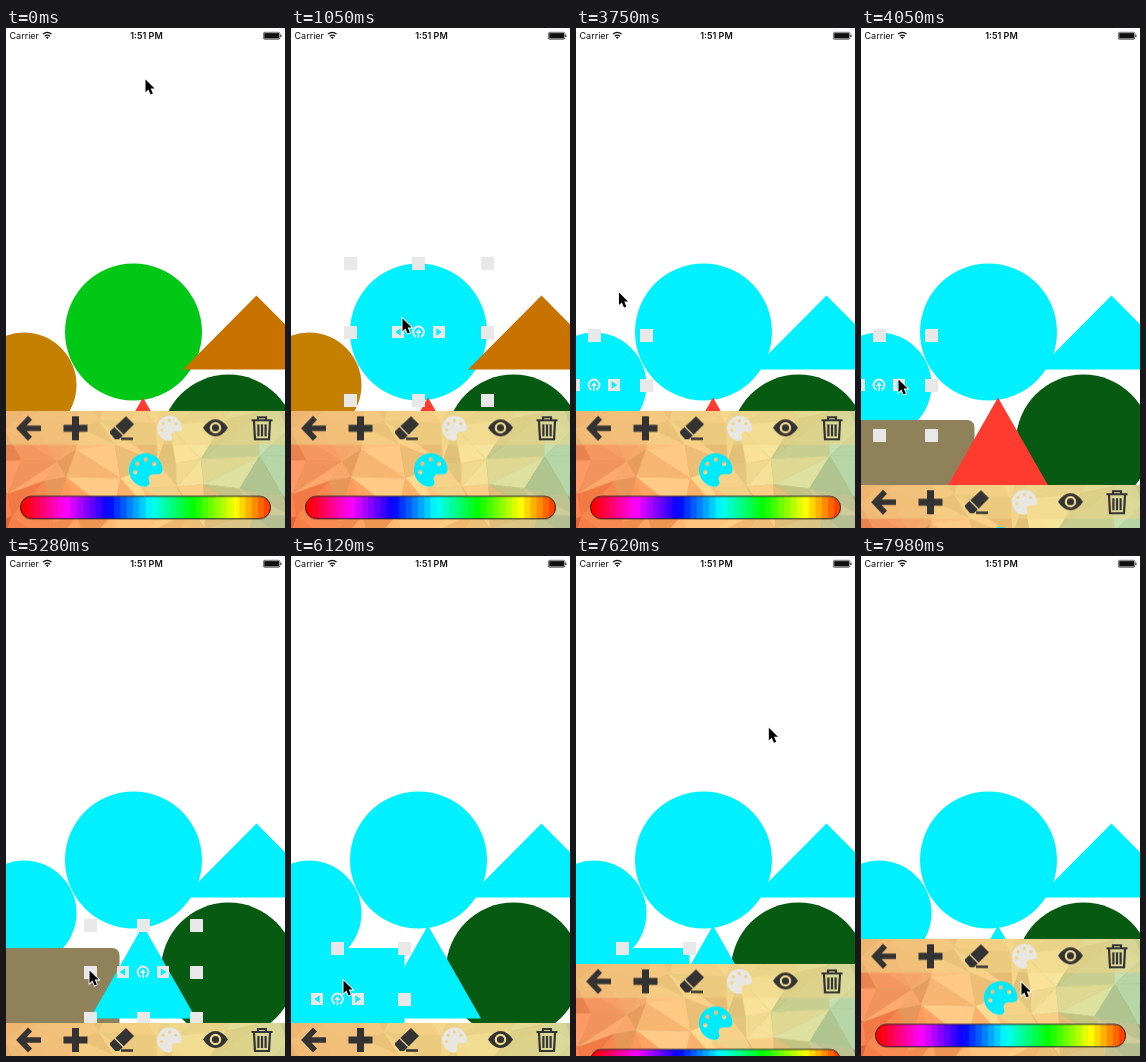
An HTML page with a canvas that plays this animation: 279x500 px, repeating every 8000 ms.

```html
<!DOCTYPE html>
<html lang="en">
<head>
<meta charset="utf-8">
<style>
  html, body { margin: 0; width: 100%; height: 100%; overflow: hidden; background: #fff; }
  canvas { display: block; width: 279px; height: 500px; }
</style>
</head>
<body>
<canvas id="stage" width="279" height="500"></canvas>
<script>
const W = 279, H = 500, LOOP = 8000;
const CYAN = '#00f0ff', INK = '#333', PALE = '#e8e8e8';
const ctx = document.getElementById('stage').getContext('2d');

// Shapes from back to front; each turns cyan and becomes selected at its time.
const shapes = [
  { kind: 'circle', x: 127.5, y: 304, rx: 68.5, ry: 68.5, color: '#00c814', at: 1050 },
  { kind: 'circle', x: 18, y: 357, rx: 52.5, ry: 50, r: 52.5, color: '#c68000', at: 2820 },
  { kind: 'triangle', x: 250.5, y: 304.5, rx: 73.5, ry: 37, color: '#c87200', at: 1920 },
  { kind: 'circle', x: 222.5, y: 414, rx: 67.5, ry: 67.5, color: '#075a12', at: Infinity },
  { kind: 'rect', x: 46.5, y: 443, rx: 67, ry: 51, color: '#8f825b', at: 6120 },
  { kind: 'triangle', x: 137, y: 416, rx: 53, ry: 46.5, color: '#ff3b30', at: 4920 }
];

// Pointer moves: start, end, target x, y and optional bend point.
const startPoint = [139, 51];
const moves = [
  [330, 690, 60, 290, 108, 150],
  [690, 870, 111, 290, 75, 318],
  [1290, 1740, 227, 295, 170, 286],
  [2190, 2310, 36, 346],
  [2940, 3090, 70, 399, 40, 385],
  [3090, 3330, 45, 223, 90, 310],
  [3570, 4050, 37, 351],
  [4050, 4350, 151, 402, 85, 375],
  [4560, 4620, 139, 410],
  [5160, 5280, 83, 414],
  [5280, 5550, 52, 424],
  [6150, 6270, 150, 477, 80, 465],
  [6270, 6420, 253, 390, 225, 450],
  [6840, 7050, 208, 403],
  [7290, 7530, 200, 141],
  [7530, 7960, 160, 426, 165, 270]
];

const clamp = v => Math.max(0, Math.min(1, v));
const ease = v => (v = clamp(v), v * v * (3 - 2 * v));

function pointerAt(t) {
  let [x, y] = startPoint;
  for (const [t0, t1, tx, ty, bx = (x + tx) / 2, by = (y + ty) / 2] of moves) {
    if (t < t0) break;
    const p = ease((t - t0) / (t1 - t0)), q = 1 - p;
    x = q * q * x + 2 * q * p * bx + p * p * tx;
    y = q * q * y + 2 * q * p * by + p * p * ty;
  }
  return [x, y];
}

function fillPath(c, path, color, x = 0, y = 0, scale = 1) {
  c.save();
  c.translate(x, y);
  c.scale(scale, scale);
  c.fillStyle = color;
  c.fill(new Path2D(path), 'evenodd');
  c.restore();
}

function strokePath(c, path, color, width, x = 0, y = 0) {
  c.save();
  c.translate(x, y);
  c.strokeStyle = color;
  c.lineWidth = width;
  c.stroke(new Path2D(path));
  c.restore();
}

const dot = (x, y, r) => `M${x - r} ${y}a${r} ${r} 0 1 0 ${2 * r} 0a${r} ${r} 0 1 0 ${-2 * r} 0z`;
const PALETTE = 'M204 5C105 24 25 104 5 203c-37 187 132 327 259 307 41-6 61-55 42-92-23-45 10-98 61-98h80c36 0 65-30 65-65C511 97 368-27 204 5z' +
  dot(96, 288, 34) + dot(128, 160, 34) + dot(256, 96, 34) + dot(384, 160, 34);

function makePanel() {
  const canvas = document.createElement('canvas');
  canvas.width = W;
  canvas.height = 117;
  const c = canvas.getContext('2d');
  let seed = 11;
  const random = () => (seed = seed * 16807 % 2147483647) / 2147483647;

  // Low-poly backdrop on a jittered grid.
  const stops = [[238, 136, 84], [247, 176, 110], [247, 207, 132], [226, 215, 143], [166, 203, 160]];
  const tint = (x, y) => {
    const u = clamp(x / W) * 3.999, i = Math.floor(u), f = u - i;
    const light = (random() - .5) * 34;
    const warm = y > 85 ? [6, -18, -16] : [0, 0, 0];
    return `rgb(${stops[i].map((v, k) => Math.round(v + (stops[i + 1][k] - v) * f + light + warm[k]))})`;
  };
  const cols = 10, rows = 5, grid = [];
  for (let j = 0; j <= rows; j++)
    for (let i = 0; i <= cols; i++)
      grid.push([i * 34 - 30 + (random() - .5) * 26, j * 32 - 20 + (random() - .5) * 22]);
  for (let j = 0; j < rows; j++)
    for (let i = 0; i < cols; i++) {
      const n = j * (cols + 1) + i, a = grid[n], b = grid[n + 1], d = grid[n + cols + 1], e = grid[n + cols + 2];
      for (const tri of random() < .5 ? [[a, b, d], [b, e, d]] : [[a, b, e], [a, e, d]]) {
        const path = 'M' + tri.map(p => p.join(' ')).join('L') + 'z';
        const color = tint((tri[0][0] + tri[1][0] + tri[2][0]) / 3, (tri[0][1] + tri[1][1] + tri[2][1]) / 3);
        fillPath(c, path, color);
        strokePath(c, path, color, .7);
      }
    }
  c.fillStyle = 'rgba(239,214,136,.55)';
  c.fillRect(0, 0, W, 33.5);

  // Toolbar icons, centred on their slots.
  const mid = 17;
  strokePath(c, 'M1-10.5L-9 0L1 10.5M-8 0H12', INK, 5.6, 23, mid);
  strokePath(c, 'M0-12V12M-12 0H12', INK, 7, 69.5, mid);
  fillPath(c, 'M4-12L12-4L-3 11H-7L-12 5V3z', INK, 116, mid);
  strokePath(c, 'M-7.5-2L2 7.5', '#ead095', 1.3, 116, mid);
  strokePath(c, 'M-1 10.5H11', INK, 2.5, 116, mid);
  fillPath(c, PALETTE, '#e7e6e0', 151, mid - 12.5, 25 / 512);
  fillPath(c, 'M-12.5 0Q-7-8.5 0-8.5T12.5 0Q7 8.5 0 8.5T-12.5 0z' + dot(0, 0, 5.8) + dot(0, 0, 3.6), INK, 209.5, mid - .5);
  strokePath(c, 'M-10.5-8H10.5M-4-8V-11H4V-8M-8-7L-7 11H7L8-7M-3.6-4V8M0-4V8M3.6-4V8', INK, 2.2, 256, mid);

  // Large palette and hue strip.
  fillPath(c, PALETTE, '#00eaff', 123, 42, 33.5 / 512);
  c.save();
  c.beginPath();
  c.roundRect(14.5, 85, 250, 22.5, 11);
  c.clip();
  const bands = 40, step = 250 / bands;
  for (let i = 0; i < bands; i++) {
    c.fillStyle = `hsl(${360 - 345 * i / (bands - 1)} 100% 50%)`;
    c.fillRect(14.5 + i * step, 85, step + 1, 23);
  }
  c.restore();
  c.strokeStyle = '#222';
  c.lineWidth = 1;
  c.beginPath();
  c.roundRect(14.5, 85, 250, 22.5, 11);
  c.stroke();
  return canvas;
}
const panel = makePanel();

function drawShape({ kind, x, y, rx, ry, r = rx, color, at }, t) {
  ctx.fillStyle = t >= at ? CYAN : color;
  ctx.beginPath();
  if (kind === 'circle') ctx.arc(x, y, r, 0, 7);
  else if (kind === 'rect') ctx.roundRect(x - rx, y - ry, 2 * rx, 2 * ry, 7);
  else {
    ctx.moveTo(x, y - ry);
    ctx.lineTo(x + rx, y + ry);
    ctx.lineTo(x - rx, y + ry);
  }
  ctx.fill();
}

function drawSelection({ x, y, rx, ry }) {
  const square = (cx, cy, s = 13) => {
    ctx.fillStyle = PALE;
    ctx.fillRect(Math.round(cx - s / 2), Math.round(cy - s / 2), s, s);
  };
  for (const i of [-1, 0, 1])
    for (const j of [-1, 0, 1])
      if (i || j) square(x + i * rx, y + j * ry);
  for (const side of [-1, 1]) {
    square(x + side * 20.3, y, 12);
    fillPath(ctx, `M${side * 3} 0L${-side * 2.5}-3.7V3.7z`, CYAN, x + side * 20.3, y);
  }
  strokePath(ctx, 'M-2.5 4.8A5.4 5.4 0 1 1 2.5 4.8', PALE, 2, x, y);
  strokePath(ctx, 'M0 6V-1', PALE, 1.6, x, y);
  fillPath(ctx, 'M-3 1L0-3L3 1z', PALE, x, y);
}

function drawStatusBar() {
  ctx.fillStyle = '#111';
  ctx.font = '9px Inter, sans-serif';
  ctx.textAlign = 'left';
  ctx.fillText('Carrier', 3.5, 11);
  ctx.font = '600 9px Inter, sans-serif';
  ctx.textAlign = 'center';
  ctx.fillText('1:51 PM', 140.5, 11);
  strokePath(ctx, 'M-4.3-5Q0-8.4 4.3-5M-2.6-2.8Q0-4.9 2.6-2.8', '#111', 1.3, 41.3, 11);
  fillPath(ctx, 'M0 0L-1.6-1.7Q0-2.8 1.6-1.7z', '#111', 41.3, 11);
  ctx.strokeStyle = '#111';
  ctx.lineWidth = .6;
  ctx.beginPath();
  ctx.roundRect(257.4, 4.3, 16.4, 7, 1.3);
  ctx.stroke();
  ctx.fillRect(258.2, 5.1, 14.8, 5.4);
  ctx.fillRect(274.4, 6.6, 1, 2.4);
}

function drawPointer(x, y) {
  const arrow = 'M.5 .5V13.2L3.4 10.5L5.6 15.6L7.9 14.6L5.7 9.6H9.6z';
  strokePath(ctx, arrow, '#fff', 1.8, x, y);
  fillPath(ctx, arrow, '#000', x, y);
}

function draw(t) {
  ctx.fillStyle = '#fff';
  ctx.fillRect(0, 0, W, H);
  drawStatusBar();
  shapes.forEach(s => drawShape(s, t));
  const selected = shapes.filter(s => t >= s.at).sort((a, b) => b.at - a.at)[0];
  if (selected) drawSelection(selected);
  const hidden = ease((t - 3815) / 300) - ease((t - 7430) / 300);
  ctx.drawImage(panel, 0, 383.3 + 83.7 * hidden);
  drawPointer(...pointerAt(t));
}

const begin = performance.now();
(function frame() {
  draw((performance.now() - begin) % LOOP);
  requestAnimationFrame(frame);
})();
</script>
</body>
</html>
```
